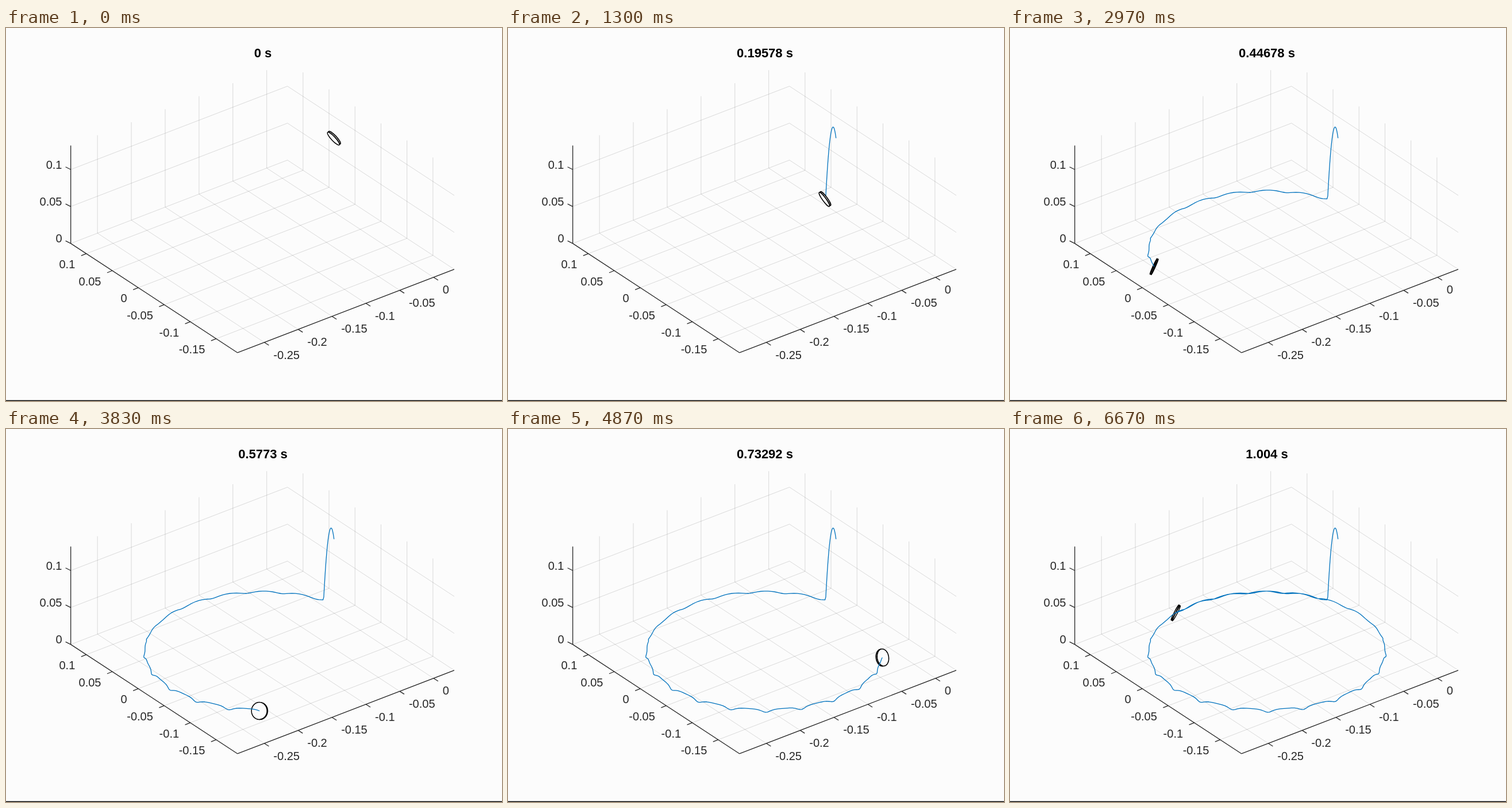
Animation of 863x649 px, one loop 6700 ms. Source, as an HTML page:

```html
<!DOCTYPE html>
<html lang="en">
<head>
<meta charset="utf-8">
<title>Rolling coin</title>
<style>
  html, body { margin: 0; width: 100%; height: 100%; overflow: hidden; background: #fcfcfc; }
  svg { display: block; width: 863px; height: 649px; }
  text { font: 20px "Liberation Sans", Arial, sans-serif; fill: #262626; }
  #title { font-weight: bold; font-size: 22px; fill: #000; text-anchor: middle; }
  path { fill: none; }
  #grid { stroke: #262626; stroke-opacity: .16; }
  #axes { stroke: #262626; stroke-width: 1.3; }
  #trail { stroke: #0072bd; stroke-width: 1.3; stroke-linejoin: round; }
  #coin { stroke: #000; stroke-width: 1.5; }
  #coin ellipse { fill: #fcfcfc; }
  #ribs { stroke-width: .9; }
</style>
</head>
<body>
<svg viewBox="0 0 863 649">
  <path id="grid"/>
  <path id="axes"/>
  <g id="labels"></g>
  <rect y="647.6" width="863" height="1.4"/>
  <text id="title" x="447" y="51"></text>
  <path id="trail"/>
  <g id="coin"><ellipse id="back"/><path id="ribs"/><ellipse id="front"/></g>
</svg>
<script>
const $ = id => document.getElementById(id);
const { sin, cos, PI } = Math, RAD = PI / 180;

// Orthographic view: azimuth -37.5 deg, elevation 30 deg
const SCALE = 1485, COS_EL = cos(30 * RAD), SIN_EL = .5;
const X = [-.2895, .0306], Y = [-.191, .13], Z = [0, .1325];
const project = (x, y, z) => [
  571.2 + 1178 * x - 904 * y,
  320.7 - 453 * x - 592 * y - SCALE * COS_EL * z
];
const segment = (a, b) => `M${a.map(v => v.toFixed(2))}L${b.map(v => v.toFixed(2))}`;

function drawAxes() {
  let grid = '', axes = '';
  const line = (a, b) => segment(project(...a), project(...b));
  const tick = ([x, y], dx, dy) => { axes += segment([x, y], [x + dx, y + dy]); };
  const label = (value, x, y, anchor) => {
    const text = document.createElementNS('http://www.w3.org/2000/svg', 'text');
    text.setAttribute('x', x);
    text.setAttribute('y', y);
    text.setAttribute('text-anchor', anchor);
    text.textContent = value;
    $('labels').append(text);
  };
  const values = (from, to) => Array.from({ length: to - from + 1 }, (_, i) => (from + i) / 20);

  for (const x of values(-5, 0)) {
    grid += line([x, Y[0], 0], [x, Y[1], 0]) + line([x, Y[1], 0], [x, Y[1], Z[1]]);
    const p = project(x, Y[0], 0);
    tick(p, 8, 5);
    label(x, p[0] + 16, p[1] + 28.5, 'start');
  }
  for (const y of values(-3, 2)) {
    grid += line([X[0], y, 0], [X[1], y, 0]) + line([X[1], y, 0], [X[1], y, Z[1]]);
    const p = project(X[0], y, 0);
    tick(p, -9, 3.5);
    label(y, p[0] - 19.5, p[1] + 25.5, 'end');
  }
  for (const z of values(0, 2)) {
    grid += line([X[0], Y[1], z], [X[1], Y[1], z]) + line([X[1], Y[1], z], [X[1], Y[0], z]);
    const p = project(X[0], Y[1], z);
    tick(p, -9, -4.5);
    label(z, 97.5, p[1] - 1.5, 'end');
  }
  axes += line([X[0], Y[1], Z[1]], [X[0], Y[1], 0])
        + line([X[0], Y[1], 0], [X[0], Y[0], 0])
        + line([X[0], Y[0], 0], [X[1], Y[0], 0]);
  $('grid').setAttribute('d', grid);
  $('axes').setAttribute('d', axes);
}

// Screen position of the coin's centre, heading of its normal, lean and yaw (degrees)
const LANDING = .1954;
function pose(t) {
  if (t < LANDING) {
    return { x: 570.7 - 92 * t, y: 191.6 - 698 * t + 6308 * t * t, heading: -37, lean: 27, yaw: 30 };
  }
  const angle = -110.7 - 548 * (t - .29116);
  const nutation = (-270.5 - angle) * 20.87 * RAD;
  const phi = angle + sin(nutation);
  const radius = 206 + 1.2 * cos(nutation) + .6 * cos(2 * nutation);
  const drop = 2.2 * cos(nutation) + .3 * cos(2 * nutation);
  const yaw = -30 * sin(nutation);
  return {
    x: 447 + radius * cos(phi * RAD),
    y: 386.6 + radius * SIN_EL * sin(phi * RAD) + drop,
    heading: phi + yaw,
    lean: 25 + 6 * cos(nutation),
    yaw
  };
}

const COIN_RADIUS = 14.9, HALF_THICKNESS = 1.4, RIBS = 40;
function drawCoin({ x, y, heading, lean, yaw }) {
  const near = cos(lean * RAD) * sin(heading * RAD), height = sin(lean * RAD);
  const nx = cos(lean * RAD) * cos(heading * RAD);
  const ny = SIN_EL * near - COS_EL * height;
  const facing = SIN_EL * height + COS_EL * near;
  const length = Math.hypot(nx, ny) || 1;
  const side = Math.sign(facing) || 1;
  const ox = nx * HALF_THICKNESS * side, oy = ny * HALF_THICKNESS * side;
  const minor = COIN_RADIUS * Math.abs(facing);
  const turn = Math.atan2(ny, nx) / RAD;

  const place = (id, cx, cy) => {
    const e = $(id);
    e.setAttribute('rx', minor);
    e.setAttribute('ry', COIN_RADIUS);
    e.setAttribute('transform', `translate(${cx} ${cy}) rotate(${turn})`);
  };
  place('back', x - ox, y - oy);
  place('front', x + ox, y + oy);

  let ribs = '';
  for (let i = 0; i < RIBS; i++) {
    const a = i / RIBS * 2 * PI, u = minor * cos(a) / length, v = COIN_RADIUS * sin(a) / length;
    const px = x + u * nx - v * ny, py = y + u * ny + v * nx;
    ribs += segment([px - ox, py - oy], [px + ox, py + oy]);
  }
  $('ribs').setAttribute('d', ribs);

  // The trail leaves through one face; it shows only when that face is visible
  const svg = $('coin').parentNode;
  svg.append(facing * yaw > 0 ? $('trail') : $('coin'));
}

const STEP = .00502, LOOP = 6700;
function render(ms) {
  const frame = Math.floor((Math.floor(ms / 10) + .5) * .3);
  const t = frame * STEP;
  $('title').textContent = `${parseFloat(t.toPrecision(5))} s`;
  const points = [];
  for (let i = 0; i <= frame * 2; i++) {
    const p = pose(i * STEP / 2);
    points.push(`${p.x.toFixed(2)},${p.y.toFixed(2)}`);
  }
  $('trail').setAttribute('d', 'M' + points.join('L'));
  drawCoin(pose(t));
}

drawAxes();
const start = performance.now();
function tickClock() {
  render((performance.now() - start) % LOOP);
  requestAnimationFrame(tickClock);
}
tickClock();
</script>
</body>
</html>
```
